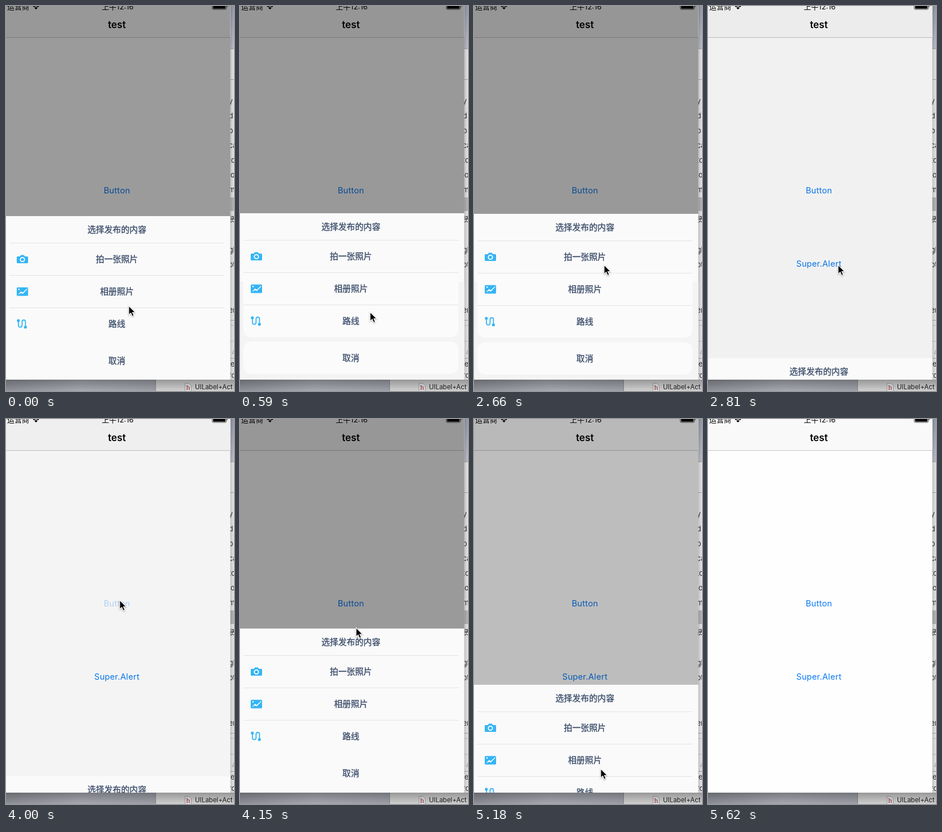
Recreate the animation shown at these times as an HTML page. Size 403 by 678 pixels, loop 5710 ms.

```html
<!DOCTYPE html>
<html lang="zh-CN">
<head>
<meta charset="utf-8">
<title>Action sheet</title>
<style>
  html, body { margin: 0; width: 100%; height: 100%; overflow: hidden; background: #fff; }
  #stage { display: block; }
  text { font-family: Inter, "Noto Sans CJK SC", "Noto Sans CJK", sans-serif; }
  .label { font-size: 14.9px; font-weight: 500; fill: #3d4e6b; stroke: #3d4e6b; stroke-width: .35px; text-anchor: middle; }
  .link { font-size: 14.7px; letter-spacing: .25px; fill: #0a7af5; text-anchor: middle; }
  .status { font-size: 13px; }
  .code { font-size: 13px; fill: #333; }
  .separator { stroke: #e3e3e4; }
  .icon { fill: #35b4f5; }
</style>
</head>
<body>
<svg id="stage" width="403" height="678" viewBox="0 0 403 678">
  <defs>
    <linearGradient id="wallpaper" x2="0" y2="1">
      <stop stop-color="#a4a7b8"/><stop offset="1" stop-color="#cdced9"/>
    </linearGradient>
    <linearGradient id="floor">
      <stop stop-color="#a3a5ae"/><stop offset=".5" stop-color="#bfc1ca"/><stop offset="1" stop-color="#b4b6c0"/>
    </linearGradient>
    <linearGradient id="shadeRight">
      <stop stop-opacity=".24"/><stop offset="1" stop-opacity=".07"/>
    </linearGradient>
    <linearGradient id="shadeDown" x2="0" y2="1">
      <stop stop-opacity=".36"/><stop offset="1" stop-opacity=".12"/>
    </linearGradient>
  </defs>

  <!-- desktop behind the phone window -->
  <rect x="396" width="7" height="75" fill="url(#wallpaper)"/>
  <rect y="658" width="264" height="20" fill="url(#floor)"/>
  <rect x="396" y="75" width="7" height="603" fill="#f7f7f7"/>
  <rect x="264" y="658" width="139" height="20" fill="#ececec"/>
  <path d="M264.500 658v20" stroke="#999"/>
  <path d="M396 75.500h7M396 129.500h7M396 553.500h7M396 620.500h7" stroke="#b0b0b0"/>
  <rect x="396" y="337" width="7" height="24" fill="#c4c4c4"/>
  <path d="M396 562.500h7M396 590.500h7" stroke="#d0d0d0"/>
  <path d="M405 602l-5 10h5" fill="none" stroke="#aaa"/>
  <g id="code"></g>
  <path d="M316.500 664.500h7l4 4v10h-11z" fill="#fff" stroke="#b5b5b5"/>
  <text x="318.500" y="676" font-size="11" fill="#a3242c" style="font-family:'Noto Serif',serif">h</text>
  <text x="334" y="675" font-size="11.500" fill="#222">UILabel+Act</text>
  <rect x="396" width="7" height="658" fill="url(#shadeRight)"/>
  <rect y="658" width="403" height="20" fill="url(#shadeDown)"/>

  <!-- phone window -->
  <svg width="396.500" height="658" overflow="hidden">
    <rect width="397" height="658" fill="#fefefe"/>
    <rect width="397" height="55" fill="#f9f9f9"/>
    <path d="M0 55.500h397" stroke="#c6c6c8"/>
    <text class="status" x="2" y="6">运营商</text>
    <path d="M47.500 .5q5.500-4 11 0l-1.500 1.500q-4-3-8 0zM50 3q3-2 6 0l-3 3z"/>
    <text class="status" x="197.500" y="6" text-anchor="middle">上午12:16</text>
    <rect x="364.500" y="-6" width="25" height="12" rx="2" fill="none" stroke="#000" stroke-width=".7"/>
    <rect x="366" y="-5" width="22" height="9.700" rx="1"/>
    <path d="M390.500 -1.500q2 1.800 0 4z"/>
    <text x="196" y="39" font-size="17.200" font-weight="600" text-anchor="middle">test</text>
    <text id="button" class="link" x="196" y="330">Button</text>
    <text class="link" x="196" y="458.500">Super.Alert</text>
    <rect id="dim" width="397" height="658"/>

    <g id="sheet">
      <rect width="397" height="300" fill="#fafafa"/>
      <g id="cards">
        <rect y="120" width="397" height="180" fill="#f4f4f4"/>
        <rect x="6" y="100" width="380" height="118" rx="14" fill="#fbfbfb"/>
        <rect x="6" y="226" width="380" height="57" rx="14" fill="#fbfbfb"/>
      </g>
      <path id="highlight" d="M6 162h380v42q0 14-14 14H20q-14 0-14-14z" fill="#e9e9e9"/>
      <path class="separator" d="M6 47.500h380M6 104.500h380M6 161.500h380"/>
      <g id="labels"></g>

      <path class="icon" d="M20.500 71h4l2-2.500h5l2 2.500h4q1.500 0 1.500 1.500v9q0 1.500-1.500 1.500h-17q-1.500 0-1.500-1.500v-9q0-1.500 1.500-1.500z"/>
      <circle cx="29" cy="76.500" r="3.700" fill="none" stroke="#fff" stroke-width="1.800"/>

      <rect class="icon" x="19" y="125.500" width="20" height="15" rx="1.500"/>
      <path d="M21 138.500l5.500-6 3 2 8-7v1.500l-8 8-3-1.500z" fill="#fff"/>
      <circle cx="23" cy="129" r="1.300" fill="#fff"/>

      <path d="M22 184v8.500a3.200 3.200 0 0 0 6.400 0v-6.500a3 3 0 0 1 6 0v9" fill="none" stroke="#35b4f5" stroke-width="1.800"/>
      <circle class="icon" cx="21.800" cy="184" r="2.600"/>
      <circle class="icon" cx="34.300" cy="195.500" r="2.600"/>
    </g>
  </svg>

  <path id="cursor" d="M0 0v16l3.700-3.400 2.500 5.900 2.900-1.200-2.500-5.800h5z" stroke="#fff" stroke-width="1.100"
        style="filter:drop-shadow(0 1px 1px rgba(0,0,0,.35))"/>
</svg>

<script>
const LOOP = 5710, TICK = 148;
const SHEET_HEIGHT = 293, SLIDE = 200;
const $ = id => document.getElementById(id);

function addText(parent, className, x, y, content) {
  const node = document.createElementNS('http://www.w3.org/2000/svg', 'text');
  node.setAttribute('class', className);
  node.setAttribute('x', x);
  node.setAttribute('y', y);
  node.textContent = content;
  parent.append(node);
}

[['选择发布的内容', 24], ['拍一张照片', 76], ['相册照片', 133], ['路线', 190], ['取消', 254.5]]
  .forEach(([content, middle]) => addText($('labels'), 'label', 196, middle + 5, content));

[['y', 172], ['d', 198], ['p', 224], ['ca', 250], ['to', 276], ['lo', 302], ['m', 328],
 ['贤', 380], ['gl', 434], ['ot', 460], ['er', 540], ['le', 635], ['rc', 655]]
  .forEach(([content, y]) => addText($('code'), 'code', 393.5, y, content));

// [time, x, y] of the pointer tip
const pointer = [
  [0, 217, 528], [1184, 243, 550], [1332, 236, 561], [1628, 236, 561],
  [1776, 237, 520], [1924, 236, 485], [2072, 236, 485], [2220, 231, 434],
  [2368, 230, 456], [2812, 230, 456], [3700, 201, 319], [3996, 201, 319],
  [4884, 226, 610], [5032, 224, 616], [5180, 224, 616], [5624, 300, 700]
];

function pointerAt(time) {
  const next = pointer.findIndex(key => key[0] > time);
  if (next < 0) return pointer.at(-1).slice(1);
  const from = pointer[next - 1], to = pointer[next];
  const k = (time - from[0]) / (to[0] - from[0]);
  return [1, 2].map(i => from[i] + (to[i] - from[i]) * k);
}

function slide(time, start) {
  const x = Math.min(1, Math.max(0, (time - start) / SLIDE));
  return x * x * (3 - 2 * x);
}

const openness = time =>
  slide(time, -185) - slide(time, 2657) + slide(time, 3957) - slide(time, 5100);

const show = (id, visible) => $(id).setAttribute('visibility', visible ? 'visible' : 'hidden');

function draw(now) {
  const time = Math.floor((now % LOOP + 4) / TICK) * TICK;
  const open = openness(time);
  $('sheet').setAttribute('transform', `translate(0 ${Math.round(658 - SHEET_HEIGHT * open)})`);
  $('dim').setAttribute('opacity', 0.4 * open);
  $('button').setAttribute('opacity', time > 3840 && time < 4100 ? 0.28 : 1);
  show('cards', open > 0.99);
  show('highlight', time >= 888 && time < 2660);
  $('cursor').setAttribute('transform', `translate(${pointerAt(time)})`);
}

const begin = performance.now();
function loop() {
  draw(performance.now() - begin);
  requestAnimationFrame(loop);
}
loop();
</script>
</body>
</html>
```
